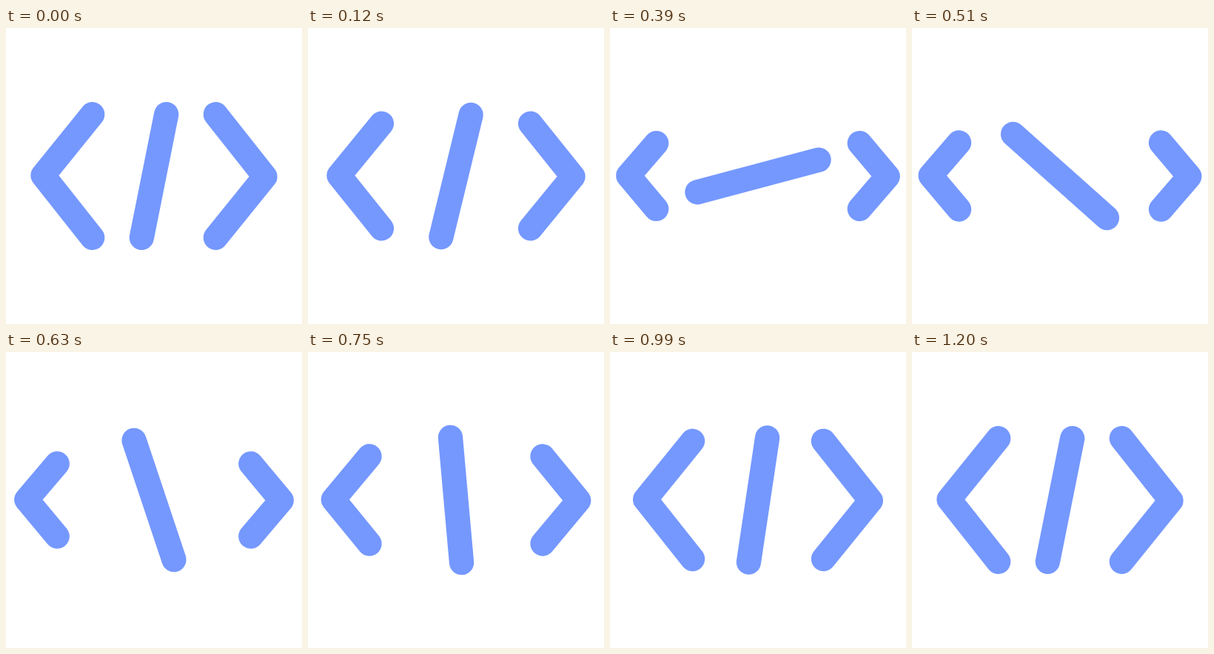
These frames come from a looping animation (400x400 px, 3.23 s). An HTML page:

```html
<!DOCTYPE html>
<html lang="en">
<head>
<meta charset="utf-8">
<title>Code icon</title>
<style>
  html, body { margin: 0; width: 100%; height: 100%; overflow: hidden; background: #fff; }
  svg { display: block; width: 100%; height: 100%; }
  path { fill: none; stroke: #7598ff; stroke-width: 33.33; stroke-linecap: round; stroke-linejoin: round; }
</style>
</head>
<body>
<svg viewBox="0 0 400 400">
  <path id="left"/>
  <path id="slash" d="M216.67 116.67 183.33 283.33"/>
  <path id="right" transform="rotate(180 200 200)"/>
</svg>
<script>
const LOOP = 3230, STEP = 30, LAST = 40, PEAK = 14;
const [left, slash, right] = ['left', 'slash', 'right'].map(id => document.getElementById(id));

// step, turn in degrees, degrees per step
const TURN = [
  [0, 0, 0], [7, 8.8, 3], [13, 63.8, 15.8], [17, 120.4, 11.2],
  [25, 163.6, 3], [33, 177.2, 0.8], [40, 180, 0]
];

const mix = (a, b, k) => a + (b - a) * k;

// Bezier easing with flat ends: (x1, 0, x2, 1)
function ease(u, x1, x2) {
  let lo = 0, hi = 1;
  for (let i = 0; i < 30; i++) {
    const s = (lo + hi) / 2, r = 1 - s;
    if (3 * r * r * s * x1 + 3 * r * s * s * x2 + s * s * s < u) lo = s;
    else hi = s;
  }
  return lo * lo * (3 - 2 * lo);
}

// Smooth curve through the keys with the given slopes
function curve(keys, n) {
  let i = 0;
  while (i < keys.length - 2 && n > keys[i + 1][0]) i++;
  const [n0, a, va] = keys[i], [n1, b, vb] = keys[i + 1];
  const d = n1 - n0, u = (n - n0) / d, r = 1 - u;
  return a * r * r * (1 + 2 * u) + b * u * u * (3 - 2 * u)
    + d * u * r * (va * r - vb * u);
}

function squeeze(n) {
  return n <= PEAK
    ? ease(n / PEAK, 0.45, 0.13)
    : 1 - ease((n - PEAK) / (LAST - PEAK), 0.53, 0.41);
}

function draw(t) {
  const n = Math.min(LAST, Math.floor(t % LOOP / STEP));
  const k = n === 0 || n === LAST ? 0 : squeeze(n);
  const x = mix(116.67, 62.5, k), y = mix(116.67, 155.7, k);
  const tip = mix(50, 24.7, k), mid = mix(199.2, 199.5, k);
  const d = `M${x} ${y} ${tip} ${mid} ${x} ${400 - y}`;
  left.setAttribute('d', d);
  right.setAttribute('d', d);
  slash.setAttribute('transform', `rotate(${curve(TURN, n)} 200 200)`);
}

const start = performance.now();
function tick() {
  draw(performance.now() - start);
  requestAnimationFrame(tick);
}
tick();
</script>
</body>
</html>
```
